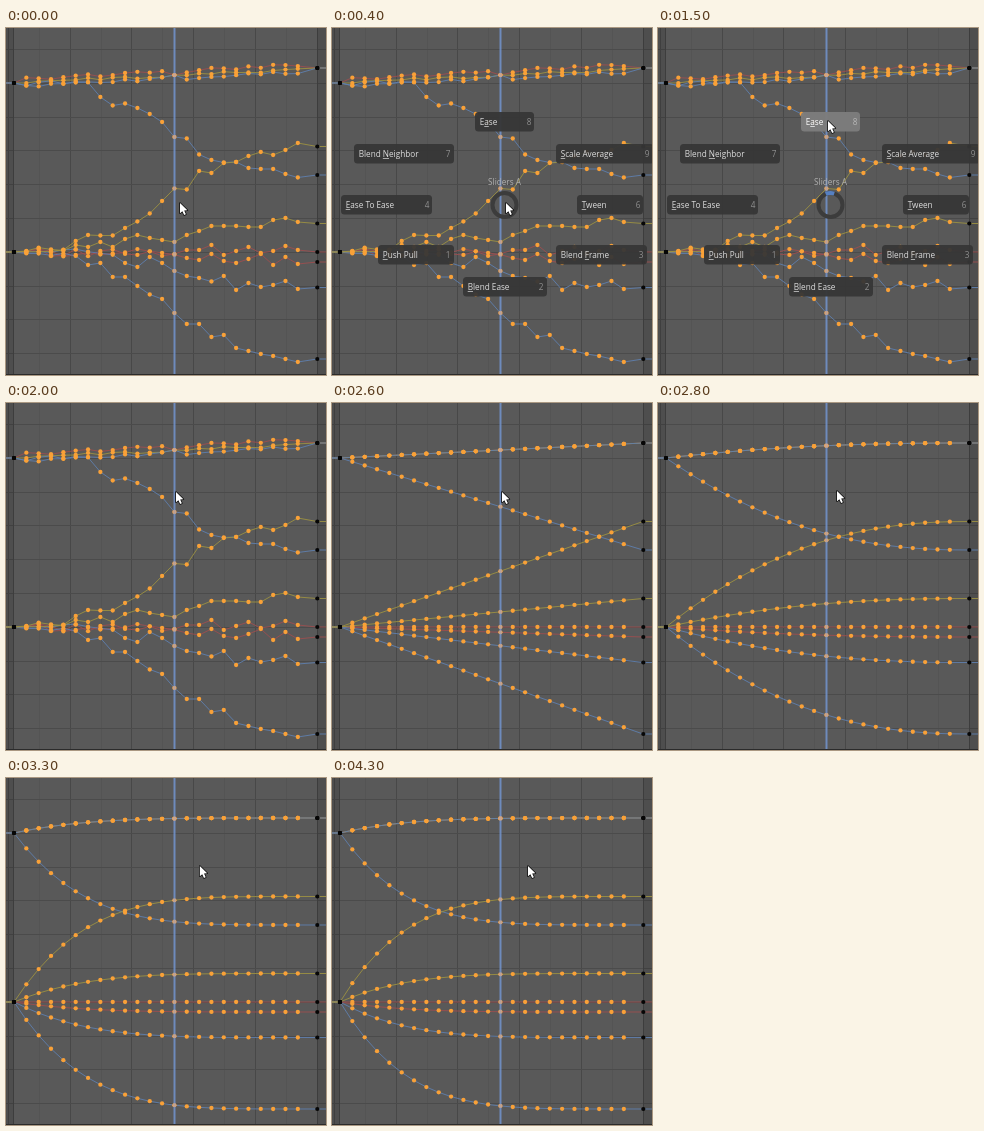
Animation, 320 px wide and 347 px high, one loop 4.8 s. Source, as an HTML page with a canvas:

```html
<!DOCTYPE html>
<html lang="en">
<head>
<meta charset="utf-8">
<title>Ease slider in a graph editor</title>
<style>
  html, body { margin: 0; width: 100%; height: 100%; overflow: hidden; background: #575757; }
  canvas { display: block; }
</style>
</head>
<body>
<canvas id="stage" width="320" height="347"></canvas>
<script>
const g = document.getElementById('stage').getContext('2d');
const LOOP = 4800, STEP = 100;
const X0 = 8, X1 = 311, GAP = 12.34, KEYS = 23, PLAYHEAD = 168.5;
const MENU_IN = 100, MENU_OUT = 1900, EASED = 2100;
const FONT = '8.2px "Open Sans", "Noto Sans", sans-serif';
const RED = '#9c4f50', OLIVE = '#9c9142', BLUE = '#5f7fae';

// Cursor path: time, x, y
const PATH = [
  [0, 174, 175], [900, 174, 175], [1000, 174, 170], [1200, 172, 128], [1400, 170, 95],
  [1500, 170, 93], [1700, 170, 89], [2600, 170, 89], [2700, 174, 89], [2800, 179, 88],
  [2900, 185, 88], [3000, 189, 88], [3200, 193, 88], [3500, 195.5, 88], [3800, 196, 88]
];

// Uneven key heights start at key `from`; earlier ones jitter around the left key.
const CURVES = [
  { color: RED, y0: 55, y1: 40, lane: -3.6 },
  { color: OLIVE, y0: 55, y1: 40, lane: 0.3 },
  { color: BLUE, y0: 55, y1: 40, lane: 3.4 },
  { color: BLUE, y0: 55, y1: 147, from: 7, ys: [69, 77.5, 75.5, 80, 86, 94, 109, 110.5, 126.5, 132, 134.5, 134, 140, 141, 141, 146, 149.5] },
  { color: RED, y0: 224, y1: 224, from: 14, ys: [222, 222, 217, 227, 223, 219, 225, 223, 218, 222] },
  { color: RED, y0: 224, y1: 234, from: 14, ys: [230, 232, 226, 233, 235, 231, 226, 237, 229, 236] },
  { color: BLUE, y0: 224, y1: 259.5, from: 9, ys: [235, 239, 229, 235, 243, 248, 250, 253.5, 248, 262, 255, 259, 257, 253, 261] },
  { color: BLUE, y0: 224, y1: 331, from: 6, ys: [237, 235, 249, 249, 258, 266.5, 271, 285, 296, 296, 309, 307, 320, 323, 326, 328, 331, 334] },
  { color: OLIVE, y0: 224, y1: 195.5, from: 5, ys: [217, 219, 214, 219, 211, 207, 210, 212, 214, 207, 203, 198, 198, 198, 199, 199, 192, 190, 194] },
  { color: OLIVE, y0: 224, y1: 118.5, from: 5, ys: [213, 207, 207.5, 207.5, 200, 193.5, 185.5, 173, 160.5, 161.5, 143, 145, 135, 134, 128, 124, 127, 122, 115] }
];

// Label, access letter index, digit, x, y, width, digit x
const ITEMS = [
  ['Ease', 1, '8', 143, 84, 59, 197],
  ['Blend Neighbor', 6, '7', 22, 116, 100, 116],
  ['Scale Average', 0, '9', 224, 116, 98, 315],
  ['Ease To Ease', 0, '4', 9, 167, 91, 95],
  ['Tween', 0, '6', 245, 167, 66, 306],
  ['Push Pull', 0, '1', 46, 217, 76, 116],
  ['Blend Frame', 6, '3', 224, 217, 91, 309],
  ['Blend Ease', 0, '2', 131, 249, 84, 209]
];

function noise(a, b) {
  const s = Math.sin(a * 91.7 + b * 37.3 + 4.1) * 43758.5453;
  return (s - Math.floor(s)) * 2 - 1;
}

function cursorAt(t) {
  let i = 1;
  while (i < PATH.length - 1 && PATH[i][0] < t) i++;
  const [ta, xa, ya] = PATH[i - 1], [tb, xb, yb] = PATH[i];
  const k = Math.min(1, Math.max(0, (t - ta) / (tb - ta)));
  return [xa + (xb - xa) * k, ya + (yb - ya) * k];
}

function unevenY(c, id, k, x) {
  if (c.lane !== undefined) {
    const base = c.y0 + (c.y1 - c.y0) * (x - X0) / (X1 - X0);
    return base + (k === 13 ? 0 : c.lane + noise(id, k) * 1.8);
  }
  if (k >= c.from) return c.ys[k - c.from];
  return c.y0 + (c.y0 < 100 ? 2 : 0) + noise(id, k) * (k === 1 ? 3 : 4.5);
}

// A power of 1 gives a straight line, higher powers ease out.
function pointsOf(c, id, power) {
  const pts = [];
  for (let k = 1; k <= KEYS; k++) {
    const x = X0 + GAP * k;
    const u = (x - X0) / (X1 - X0);
    const y = power ? c.y0 + (c.y1 - c.y0) * (1 - Math.pow(1 - u, power)) : unevenY(c, id, k, x);
    pts.push([x, y]);
  }
  return pts;
}

function rect(color, x, y, w, h) {
  g.fillStyle = color;
  g.fillRect(x, y, w, h);
}

function dot(color, x, y, r) {
  g.fillStyle = color;
  g.beginPath();
  g.arc(x, y, r, 0, Math.PI * 2);
  g.fill();
}

function drawGrid() {
  rect('#595959', 0, 0, 320, 347);
  for (let x = 2; x < 320; x += 61.7) {
    rect('#484848', Math.round(x), 0, 1, 347);
    rect('#545454', Math.round(x + 30.8), 0, 1, 347);
  }
  for (let y = 21; y < 347; y += 33.8) rect('#4b4b4b', 0, Math.round(y), 320, 1);
  rect('rgba(0,0,0,.13)', 0, 0, X0, 347);
  rect('rgba(0,0,0,.13)', X1, 0, 320 - X1, 347);
  rect('#3d3d3d', 7, 0, 1, 347);
  rect('#3d3d3d', X1, 0, 1, 347);
}

function drawCurves(power) {
  const sets = CURVES.map((c, i) => pointsOf(c, i, power));
  g.lineWidth = 0.9;
  CURVES.forEach((c, i) => {
    g.strokeStyle = c.color;
    g.beginPath();
    g.moveTo(0, c.y0);
    g.lineTo(X0, c.y0);
    sets[i].forEach(p => g.lineTo(p[0], p[1]));
    g.lineTo(X1, c.y1);
    g.lineTo(320, c.y1);
    g.stroke();
  });
  sets.flat().forEach(p => dot('#f9a138', p[0], p[1], 2.15));
  CURVES.forEach(c => {
    dot('#060606', X0, c.y0, 2.1);
    dot('#060606', X1 + 0.3, c.y1, 2.1);
  });
  rect('rgba(115,150,210,.82)', PLAYHEAD - 1, 0, 2, 347);
  sets.forEach(s => dot('rgba(205,165,140,.7)', s[12][0], s[12][1], 1.9));
}

function drawItem([label, key, digit, x, y, w, dx], hot) {
  g.fillStyle = hot ? 'rgba(125,125,125,.96)' : 'rgba(54,54,54,.95)';
  g.beginPath();
  g.roundRect(x, y, w, 19.5, 3.5);
  g.fill();
  const tx = x + 4.7, ty = y + 12.8;
  g.textAlign = 'left';
  g.fillStyle = hot ? '#ffffff' : '#dedede';
  g.fillText(label, tx, ty);
  const before = g.measureText(label.slice(0, key)).width;
  g.fillRect(tx + before, ty + 1.4, g.measureText(label[key]).width, 0.7);
  g.textAlign = 'center';
  g.fillStyle = hot ? '#b8b8b8' : '#909090';
  g.fillText(digit, dx, ty);
}

function drawMenu(cy) {
  const hot = cy < 164;
  g.font = FONT;
  ITEMS.forEach((item, i) => drawItem(item, hot && i === 0));
  g.textAlign = 'center';
  g.fillStyle = '#b0b0b0';
  g.fillText('Sliders A', 172.5, 156.8);
  g.lineWidth = 4;
  g.strokeStyle = '#3c3c3c';
  g.beginPath();
  g.arc(172.5, 177, 12, 0, Math.PI * 2);
  g.stroke();
  if (hot) {
    g.strokeStyle = '#5680c2';
    g.beginPath();
    g.arc(172.5, 177, 12, -Math.PI * 0.63, -Math.PI * 0.4);
    g.stroke();
  }
}

function drawCursor(x, y) {
  const shape = [[0, 0], [0, 10.3], [2.4, 8.2], [4.1, 12], [5.9, 11.2], [4.2, 7.6], [7.4, 7.3]];
  g.beginPath();
  shape.forEach(([a, b]) => g.lineTo(x + a, y + b));
  g.closePath();
  g.lineJoin = 'round';
  g.lineWidth = 1.5;
  g.strokeStyle = '#0c0c0c';
  g.stroke();
  g.fillStyle = '#ffffff';
  g.fill();
}

function draw(t) {
  const [cx, cy] = cursorAt(t);
  drawGrid();
  drawCurves(t < EASED ? 0 : 1 + (cx - 170) * 0.143);
  if (t >= MENU_IN && t < MENU_OUT) drawMenu(cy);
  rect('#2b2b2b', 0, 346, 320, 1);
  drawCursor(cx, cy);
}

const start = performance.now();
function tick() {
  const t = (performance.now() - start) % LOOP;
  draw(Math.floor(t / STEP) * STEP);
  requestAnimationFrame(tick);
}
tick();
</script>
</body>
</html>
```
